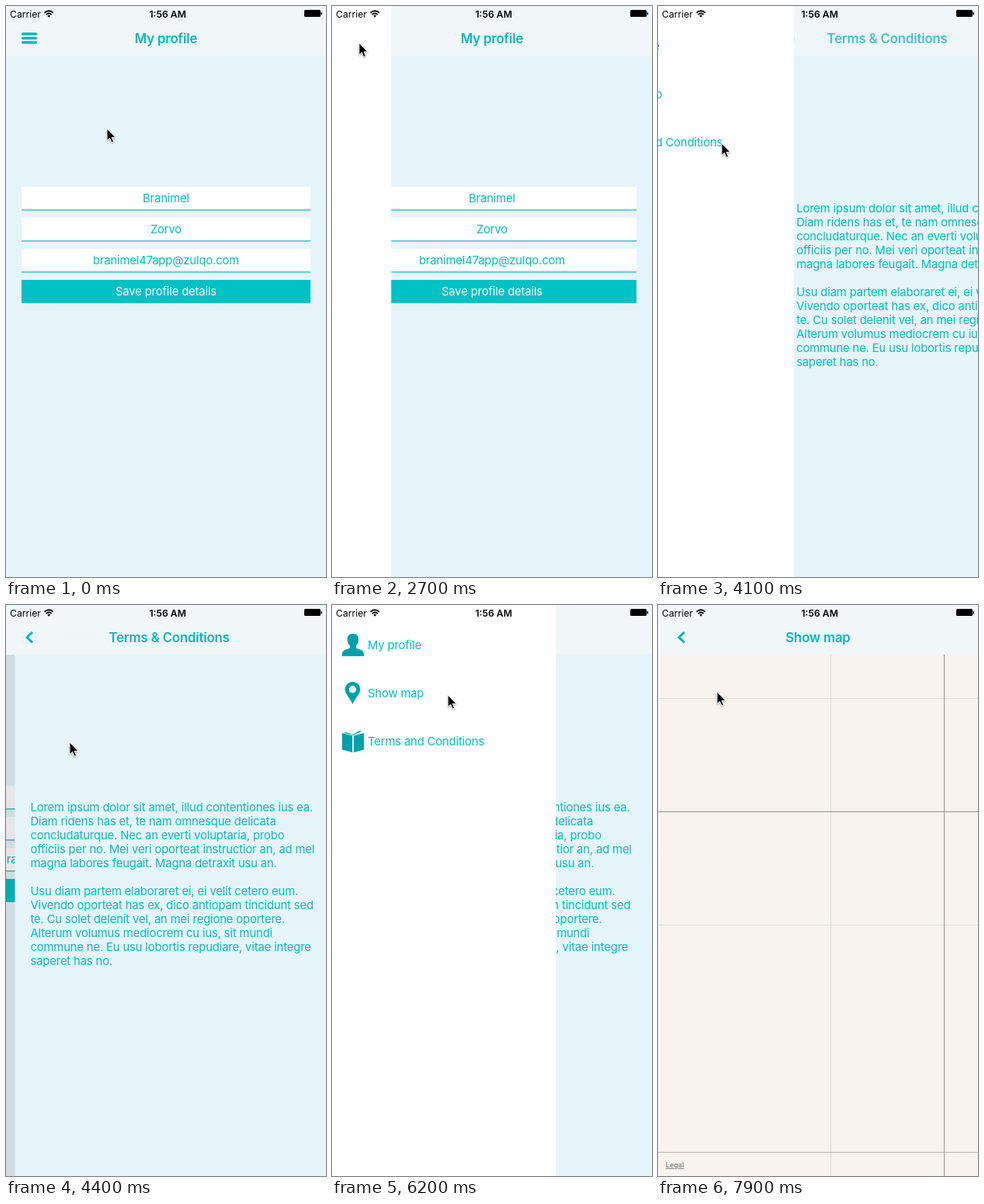
An HTML page for the animation above (8000 ms loop, 412 by 736 pixels).

```html
<!DOCTYPE html>
<html lang="en">
<head>
<meta charset="utf-8">
<title>Side menu</title>
<style>
html, body { margin: 0; width: 100%; height: 100%; overflow: hidden; background: #e6f5f9; }
svg { display: block; width: 412px; height: 736px; }
text { font: 14.8px Inter, Roboto, sans-serif; letter-spacing: -.145px; fill: #00bdbd; white-space: pre; }
.mid { text-anchor: middle; }
.title { font-size: 16.8px; font-weight: 600; letter-spacing: -.17px; text-anchor: middle; fill: #00b8b8; }
.status { font-size: 12.2px; letter-spacing: 0; fill: #000; }
.bold { font-weight: 600; }
.legal { font-size: 9px; font-weight: 500; letter-spacing: 0; fill: #777; text-decoration: underline; }
.icon { fill: #00a0a8; }
.line { fill: none; stroke: #00b8b8; stroke-linecap: round; }
</style>
</head>
<body>
<svg viewBox="0 0 412 736">
  <g id="profile">
    <rect width="412" height="736" fill="#e6f5f9"/>
    <g id="fields"></g>
    <rect x="20" y="353" width="372" height="30" fill="#00c1c4"/>
    <text class="mid" x="206" y="373.4" style="fill:#fff">Save profile details</text>
    <rect id="profileDim" width="412" height="736"/>
  </g>

  <g id="terms">
    <rect width="412" height="736" fill="#e6f5f9"/>
    <g id="lorem"></g>
    <rect id="termsDim" width="412" height="736"/>
  </g>

  <g id="map">
    <rect width="412" height="736" fill="#f0ead2"/>
    <g id="tiles">
      <rect width="412" height="736" fill="#f8f4ed"/>
      <g fill="none" stroke-width="1">
        <path stroke="#dfdcd6" d="M222.5 64V736M0 120.5H412M0 412.5H412"/>
        <path stroke="#b5b3af" d="M0 705.5H412"/>
        <path stroke="#929190" d="M368.5 64V736M0 266.5H412"/>
      </g>
      <text class="legal" x="10" y="725">Legal</text>
    </g>
  </g>

  <rect width="412" height="64" fill="#f1f6f9"/>
  <path id="burger" class="line" stroke-width="3.5" d="M21.7 36H38.3M21.7 41.5H38.3M21.7 47H38.3"/>
  <path id="back" class="line" stroke-width="3" style="stroke-linecap:butt" d="M34 35L27 41.7L34 48.4"/>
  <text class="title" id="profileTitle" x="206" y="48.2">My profile</text>
  <text class="title" id="termsTitle" x="206" y="48.2">Terms &amp; Conditions</text>
  <text class="title" id="mapTitle" x="206" y="48.2">Show map</text>

  <g id="drawer">
    <rect width="288" height="736" fill="#fff"/>
    <g class="icon">
      <path d="M27 37C32 37 34.5 40.5 34.2 45C34 48.5 32.5 51 31 52.5V55.5C36 57.5 41 58.5 41 63V66H13V63C13 58.5 18 57.5 23 55.5V52.5C21.5 51 20 48.5 19.8 45C19.5 40.5 22 37 27 37Z"/>
      <path fill-rule="evenodd" d="M26.5 99A9.8 9.8 0 0 1 36.3 108.8C36.3 115 29.5 120 26.5 128C23.5 120 16.7 115 16.7 108.8A9.8 9.8 0 0 1 26.5 99ZM26.5 104A4.7 4.7 0 1 0 26.5 113.4A4.7 4.7 0 1 0 26.5 104Z"/>
      <path d="M13 165L26.3 168.5V190L13 186.5ZM28 168.5L41 165V186.5L28 190ZM16 163.5L26.5 167L37 161.5V163.5L27 168L16 165Z"/>
    </g>
    <text x="46" y="56.8">My profile</text>
    <text x="46" y="118.8">Show map</text>
    <text x="46" y="180.8">Terms and Conditions</text>
  </g>

  <text class="status" x="5" y="15">Carrier</text>
  <g fill="none" stroke="#000" stroke-width="1.9">
    <path d="M49.6 8.7Q55.2 3.7 60.8 8.7M51.7 11.1Q55.2 8 58.7 11.1"/>
    <path fill="#000" stroke="none" d="M53.3 12.6Q55.2 11 57.1 12.6L55.2 14.7Z"/>
  </g>
  <text class="status bold mid" x="208.2" y="15">1:56 AM</text>
  <rect x="384" y="5" width="21" height="9" rx="1.5"/>
  <rect x="405.5" y="8" width="1.5" height="3.5" rx=".7"/>

  <g id="cursor" style="filter:drop-shadow(0 1.5px 1px rgba(0,0,0,.35))">
    <path d="M1 0V15.5L4.5 12.2L6.9 18L9.5 16.9L7.1 11.3H12Z" stroke="#fff" stroke-width="1" stroke-linejoin="round"/>
  </g>
</svg>

<script>
const LOOP = 8000, WIDTH = 412, DRAWER = 288;
const $ = id => document.getElementById(id);

$('fields').innerHTML = ['Branimel', 'Zorvo', 'branimel47app@zulqo.com'].map((value, i) => {
  const y = 233 + i * 40;
  return `<rect x="20" y="${y}" width="372" height="30" fill="#fff"/>
    <rect x="20" y="${y + 29.3}" width="372" height="1.2" fill="#14b4b6"/>
    <text class="mid" x="206" y="${y + 20.4}">${value}</text>`;
}).join('');

$('lorem').innerHTML = [
  'Lorem ipsum dolor sit amet, illud contentiones ius ea.',
  'Diam ridens has et, te nam omnesque delicata',
  'concludaturque. Nec an everti voluptaria, probo',
  'officiis per no. Mei veri oporteat instructior an, ad mel',
  'magna labores feugait. Magna detraxit usu an.',
  '',
  'Usu diam partem elaboraret ei, ei velit cetero eum.',
  'Vivendo oporteat has ex, dico antiopam tincidunt sed',
  'te. Cu solet delenit vel, an mei regione oportere.',
  'Alterum volumus mediocrem cu ius, sit mundi',
  'commune ne. Eu usu lobortis repudiare, vitae integre',
  'saperet has no.'
].map((line, i) => `<text x="20" y="${266.4 + i * 17.92}">${line}</text>`).join('');

// Pointer stops: time, x, y
const stops = [
  [0, 129, 158], [300, 129, 158], [500, 131, 159], [900, 131, 159],
  [1600, 27, 42], [2000, 27, 42], [2200, 26, 39], [2600, 26, 39],
  [2900, 56, 72], [3400, 81, 177], [5250, 81, 177], [5700, 55, 123],
  [5850, 3, 121], [6150, 150, 116], [6700, 75, 112], [LOOP, 75, 112]
];

const clamp = v => Math.min(1, Math.max(0, v));
const ease = (t, start, length) => {
  const u = clamp((t - start) / length);
  return u * u * (3 - 2 * u);
};
// Critically damped spring
const spring = (t, start) => {
  const s = Math.max(0, t - start) * 0.0112;
  return 1 - (1 + s) * Math.exp(-s);
};

const move = (id, x, y = 0) => $(id).setAttribute('transform', `translate(${x.toFixed(2)} ${y.toFixed(2)})`);
const fade = (id, a) => $(id).setAttribute('opacity', a.toFixed(3));

function placePage(id, enter, leave) {
  move(id, WIDTH * (1 - enter) - 0.3 * WIDTH * leave);
  if (id !== 'map') fade(id + 'Dim', 0.1 * leave);
  move(id + 'Title', 273 * (1 - enter) ** 1.17 - 134 * leave ** 1.36);
  fade(id + 'Title', enter ** 0.6 * (1 - leave) ** 1.4);
}

function placeCursor(t) {
  const i = stops.findIndex(s => s[0] > t);
  const [t0, x0, y0] = stops[i - 1], [t1, x1, y1] = stops[i];
  const k = ease(t, t0, t1 - t0);
  move('cursor', x0 + (x1 - x0) * k, y0 + (y1 - y0) * k);
}

function draw(t) {
  const toTerms = spring(t, 3915), toMap = spring(t, 6950);
  placePage('profile', 1, toTerms);
  placePage('terms', toTerms, toMap);
  placePage('map', toMap, 0);
  fade('burger', 1 - toTerms);
  fade('back', toTerms);
  fade('tiles', ease(t, 7300, 300));

  const open = ease(t, 2566, 400) - ease(t, 3930, 400) + ease(t, 5840, 300) - ease(t, 6969, 400);
  move('drawer', DRAWER * (open - 1));
  placeCursor(t);
}

const begin = performance.now();
function tick() {
  draw((performance.now() - begin) % LOOP);
  requestAnimationFrame(tick);
}
tick();
</script>
</body>
</html>
```
